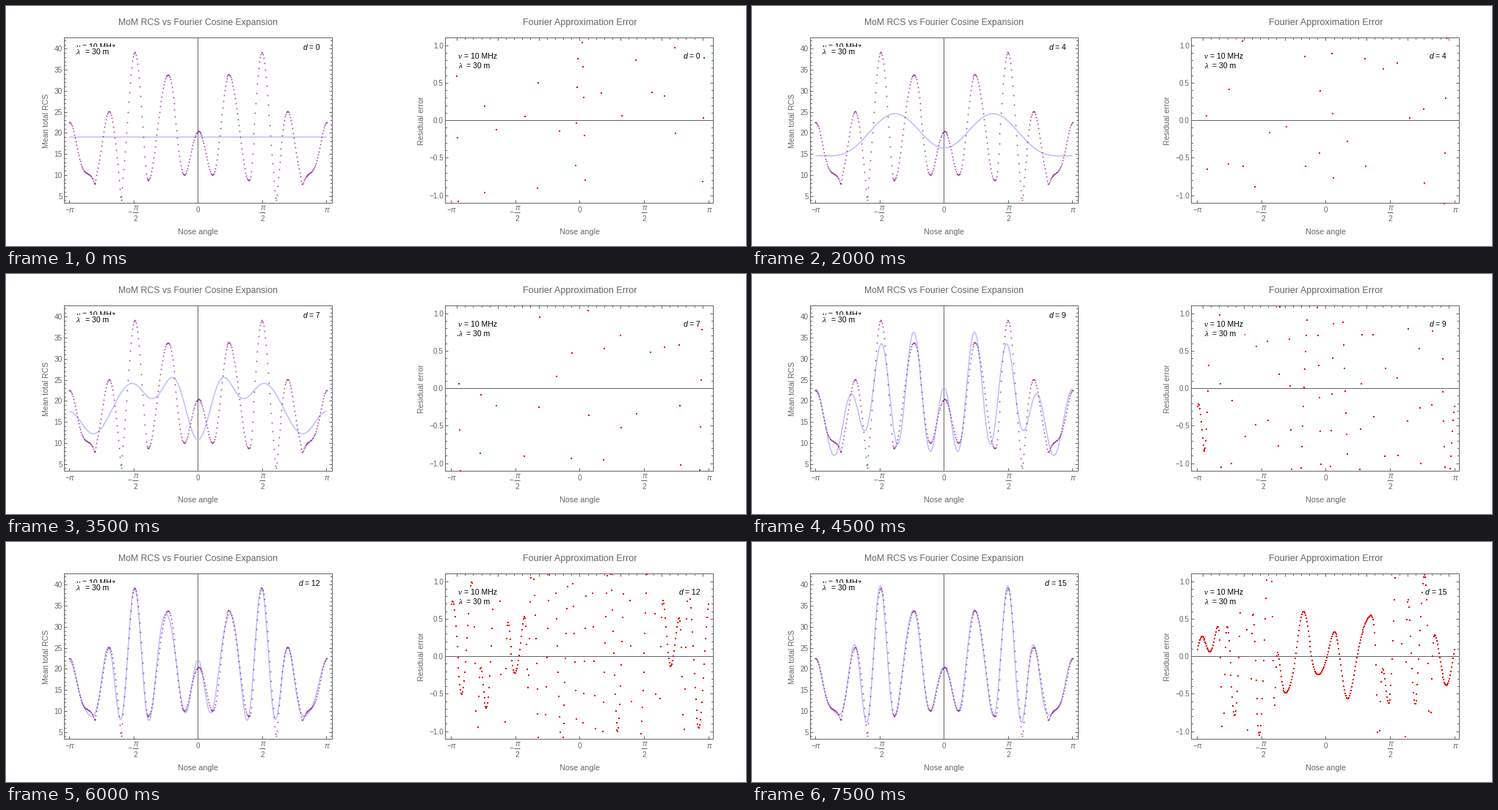
These frames come from a looping animation (1008 by 328 pixels, 8000 ms). A matplotlib script:

```python
import numpy as np
import matplotlib.pyplot as plt
from matplotlib.animation import FuncAnimation
from matplotlib.patches import Rectangle

W, H, DPI = 1008, 328, 100
PX = 72 / DPI
GRAY, PURPLE, BLUE, RED = "#666666", "#800080", "#bcbcff", "#ee0000"
SANS, SERIF = "Liberation Sans", "Liberation Serif"
TOP, BOTTOM = 43.5, 269.5
SCALE = 350.3 / (2 * np.pi)      # pixels per radian
MID_L, MID_R = 261.6, 781.9      # zero angle in each panel

# Cosine coefficients, order 0 to 15
COEF = [19.08, 2.9, -3.63, -1.99, 0.1, -3.45, -1.35, -0.79,
        8.85, 3.49, -3.53, -0.02, 2.57, -0.96, -0.55, -0.2]
NULLS = [(1.274, 1.0), (1.892, 3.2), (2.53, 1.2)]   # angle, depth
SHARP = 0.95                     # decay ratio of the nulls' harmonics
SKEW = 0.006                     # nose misalignment in radians


def series(theta, order):
    return sum(COEF[k] * np.cos(k * theta) for k in range(order + 1))


def ripple(phi):
    """Sum of SHARP**j * cos((16 + j) * phi) over j, scaled to 1 at zero."""
    turn = np.exp(1j * phi)
    return (1 - SHARP) * (turn ** 16 / (1 - SHARP * turn)).real


def mean_rcs(theta):
    t = theta - SKEW
    sharp = sum(depth * (ripple(t - a) + ripple(t + a)) for a, depth in NULLS)
    return series(t, 15) - sharp


def y_rcs(v):
    return 173.8 - 5.75 * (np.asarray(v) - 20)


def y_err(v):
    return 156.5 - 102.5 * np.asarray(v)


angle = np.radians(np.arange(-180, 181))
fine = np.linspace(-np.pi, np.pi, 700)
rcs = mean_rcs(angle)

fig = plt.figure(figsize=(W / DPI, H / DPI), dpi=DPI, facecolor="white")
ax = fig.add_axes([0, 0, 1, 1])
ax.set_xlim(0, W)
ax.set_ylim(H, 0)
ax.axis("off")


def crisp(v):
    return np.floor(v) + 0.5


def line(xs, ys, color=GRAY, width=1, z=2):
    return ax.plot(xs, ys, color=color, lw=width * PX, zorder=z, snap=False,
                   solid_capstyle="butt", solid_joinstyle="miter")[0]


def dots(xs, ys, color, size):
    return ax.plot(xs, ys, "s", color=color, ms=size * PX, mew=0, zorder=4)[0]


def text(x, y, s, size=10, color=GRAY, ha="center", va="baseline",
         font=SANS, style="normal", rot=0, z=6):
    return ax.text(x, y, s, fontsize=size * PX, color=color, ha=ha, va=va,
                   family=font, style=style, rotation=rot, zorder=z)


def cover(x, y, w, h):
    ax.add_patch(Rectangle((x, y), w, h, color="white", lw=0, zorder=5))


def frame(left, mid, title, size, label, label_x):
    right = left + 365
    line([left, right, right, left, left], [TOP, TOP, BOTTOM, BOTTOM, TOP])
    text(mid, 26, title, size)
    text(mid, 312, "Nose angle", 10.7)
    text(label_x, 156.5, label, 10.5, va="center", rot=90)
    for k in range(-2, 3):
        x = crisp(mid + k * SCALE * np.pi / 2)
        line([x, x], [BOTTOM, BOTTOM - 4])
        if k == 0:
            text(x, 282.5, "0")
        elif abs(k) == 2:
            text(x, 282.5, "−π" if k < 0 else "π", style="italic")
        else:
            c = x + (2 if k < 0 else 0)
            text(c, 279, "π", style="italic")
            line([c - 4, c + 4], [282.5, 282.5])
            text(c, 293.5, "2")
            if k < 0:
                text(c - 8, 285.5, "−")


def side_ticks(left, count, value, to_y, fmt):
    for n in count:
        y, major = crisp(to_y(value(n))), n % 5 == 0
        size = 4 if major else 2.5
        line([left, left + size], [y, y])
        line([left + 365, left + 365 - size], [y, y])
        if major:
            text(left - 2.5, y + 3.5, fmt(value(n)), ha="right")


def note(x, y, greek, words, end, z=8):
    text(x, y, greek, 11.5, "black", "left", font=SERIF, style="italic", z=z)
    text(end, y, words, 10.5, "black", "right", z=z)


def order_label(end, y):
    return (end, text(end, y, "", 10.4, "black", "right", z=8),
            text(end, y, "d", 10.4, "black", "right", style="italic", z=8))


frame(79.5, MID_L, "MoM RCS vs Fourier Cosine Expansion", 12.25,
      "Mean total RCS", 55)
frame(598.5, MID_R, "Fourier Approximation Error", 12.6,
      "Residual error", 566)
side_ticks(79.5, range(4, 43), lambda n: n, y_rcs, str)
side_ticks(598.5, range(-10, 11), lambda n: n / 10, y_err,
           lambda v: f"{v:.1f}".replace("-", "−"))
for n in range(-15, 16):
    x = crisp(MID_R + SCALE * n / 5)
    line([x, x], [TOP, TOP + (4 if n % 5 == 0 else 2.5)])
line([261.5, 261.5], [TOP, BOTTOM])
line([598.5, 963.5], [156.5, 156.5])

# The lower note's white box hides half of the upper one
note(95.5, 59, "ν", "= 10 MHz", 149.5, z=4)
cover(94, 56, 56, 12)
note(95.5, 66, "λ", "= 30 m", 140.5)
cover(615.5, 61, 55, 27)
note(616, 71.5, "ν", "= 10 MHz", 669.5)
note(616, 85, "λ", "= 30 m", 659)
cover(919, 61, 27, 13)
labels = [order_label(428, 59.5), order_label(946, 71.5)]

fit = line([], [], BLUE, 1.5, 3)
spot = MID_R + SCALE * angle
shown = (y_rcs(rcs) > TOP) & (y_rcs(rcs) < BOTTOM - 1)
samples = dots((MID_L + SCALE * angle)[shown], y_rcs(rcs)[shown], PURPLE, 1.6)
samples.set_alpha(0.8)
errors = dots([], [], RED, 2)


def draw(d):
    fit.set_data(MID_L + SCALE * fine, y_rcs(series(fine, d)))
    y = y_err(rcs - series(angle, d))
    inside = (y > TOP) & (y < BOTTOM + 1)
    errors.set_data(spot[inside], y[inside])
    for end, value, name in labels:
        value.set_text(f"= {d}")
        name.set_x(end - 17.8 - (5.6 if d > 9 else 0))
    return fit, errors


anim = FuncAnimation(fig, draw, frames=16, interval=500, repeat=True,
                     repeat_delay=0, init_func=lambda: draw(0))
plt.show()
```
